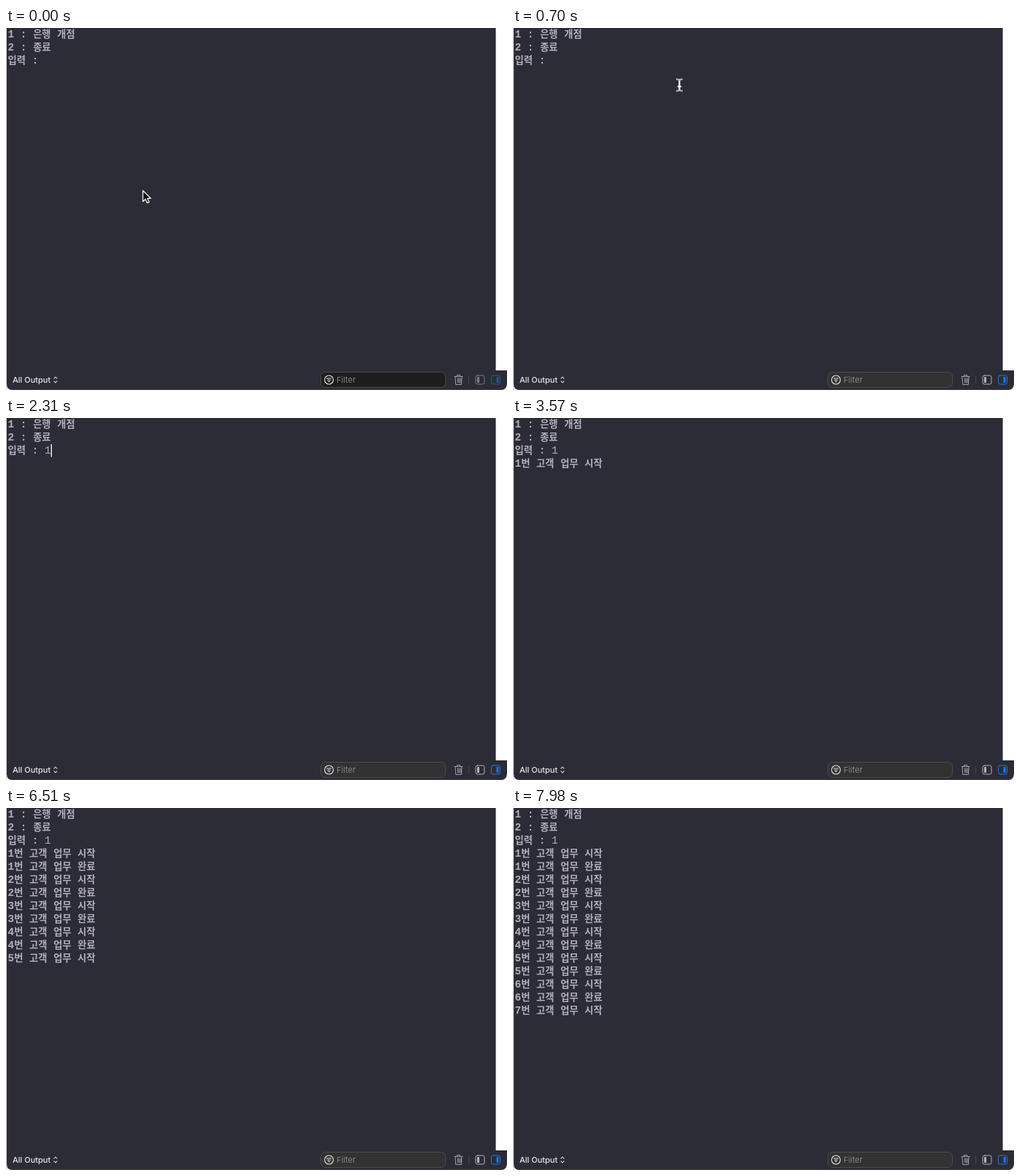
Recreate the animation shown at these times as an HTML page. Size 688x498 px, loop 8000 ms.

```html
<!DOCTYPE html>
<html lang="ko">
<head>
<meta charset="utf-8">
<style>
html, body { margin: 0; width: 100%; height: 100%; overflow: hidden; background: #fff; }
svg { display: block; width: 688px; height: 498px; }
text { white-space: pre; }
.log { font: 700 14.4px "Liberation Mono", monospace; fill: #b1afbc; }
.ko { font: 700 13.3px "Noto Sans CJK KR", "Noto Sans CJK", sans-serif; }
.ui { font: 500 11px Inter, sans-serif; }
.line { fill: none; stroke-linecap: round; stroke-linejoin: round; }
</style>
</head>
<body>
<svg viewBox="0 0 688 498">
  <path d="M1 0H672.600V471H688V490Q687 498 680 498H9Q1 498 1 490Z" fill="#2c2c37"/>
  <rect width="1" height="498" fill="#d0d0d4"/>
  <path d="M9 497.500H680" stroke="#403f4a"/>

  <g id="log" class="log"></g>
  <rect id="caret" width="1.300" height="17.500" fill="#fff"/>

  <text class="ui" x="9" y="488" fill="#e6e6ea">All Output</text>
  <path class="line" d="M66 482.200l2-2 2 2m0 3.600l-2 2-2-2" stroke="#d5d5da" stroke-width="1.100"/>

  <rect id="field" x="432.500" y="473.500" width="171" height="21" rx="6" stroke="#4b4b4f"/>
  <circle cx="443.500" cy="484" r="6" fill="none" stroke="#e4e4e6" stroke-width="1.100"/>
  <path class="line" d="M440.500 482h6m-5 2.200h4m-2.800 2.200h1.600" stroke="#e4e4e6" stroke-width="1.100"/>
  <text class="ui" x="454" y="488" fill="#858587" style="font-weight:400">Filter</text>

  <path class="line" d="M616 479.500h11m-7.500 0v-2h4v2m-6.500 0l.7 11h7.600l.7-11m-5.500 2.500l.2 6m3.600-6l-.2 6m-1.800-6v6" stroke="#a09fa8"/>
  <path d="M635.500 479v10" stroke="#474651"/>
  <g id="left"><rect class="line" x="645" y="478" width="12" height="12" rx="2.500" stroke="currentColor"/>
    <rect x="647" y="480" width="3" height="8" rx=".6" fill="currentColor"/></g>
  <g id="right"><rect class="line" x="666.500" y="478" width="12" height="12" rx="2.500" stroke="currentColor"/>
    <rect x="673.500" y="480" width="3" height="8" rx=".6" fill="currentColor"/></g>

  <path id="arrow" d="M.5.700V15.700L4 12.500 6.400 17.700 9 16.600 6.700 11.400H11.300Z" fill="#000" stroke="#fff" stroke-width="1.300" stroke-linejoin="round"/>
  <g id="beam" class="line">
    <path d="M-3.500-8Q-.8-8 0-6.500.8-8 3.500-8M0-6.500V6.500M-3.500 8Q-.8 8 0 6.500.8 8 3.500 8M-1.800 2H1.800" stroke="#fff" stroke-width="2.200"/>
    <path d="M-3.500-8Q-.8-8 0-6.500.8-8 3.500-8M-3.500 8Q-.8 8 0 6.500.8 8 3.500 8" stroke="#222" stroke-width=".6"/>
  </g>
</svg>
<script>
const $ = id => document.getElementById(id);
const LOOP = 8000, TICK = 70, CLICK = 420;
const ENTER = 2870, START = 2940, JOB = 735, BLINK = 595;

const show = (el, on) => el.style.display = on ? '' : 'none';
const wrapKo = s => s.replace(/[가-힣]+/g, '<tspan class="ko">$&</tspan>');
const row = (s, i) => `<text x="2.600" y="${13 + 18 * i}">${wrapKo(s)}</text>`;

function logLines(t) {
  const typed = t >= 2310 ? '<tspan font-weight="400">1</tspan>' : '';
  const lines = ['1 : 은행 개점', '2 : 종료', '입력 : ' + typed];
  if (t >= START) {
    const done = Math.floor((t - START) / JOB);
    for (let n = 1; n <= done + 1; n++) {
      lines.push(n + '번 고객 업무 시작');
      if (n <= done) lines.push(n + '번 고객 업무 완료');
    }
  }
  return lines;
}

// [x, y] of the caret, or null while it is hidden
function caretAt(t, count) {
  if (t >= START) return (t - START) % JOB < BLINK ? [2.500, 18 * count] : null;
  if (t >= ENTER) return [2.500, 54];
  if (t >= 2310) return [61.700, 36];
  return t >= 2240 || (t >= 1120 && t < 1680) ? [53, 36] : null;
}

function pointerAt(t) {
  if (t >= 1400) return [311, 65];
  if (t >= 1330) return [262, 63];
  if (t >= 980) return [215, 61];
  if (t >= 910) return [217, 64];
  if (t >= 840) return [223, 71];
  const p = Math.min(t / 700, 1), s = p * p * (3 - 2 * p);
  const curve = (a, b, c) => a * (1 - s) ** 2 + 2 * b * s * (1 - s) + c * s * s;
  return [curve(187.500, 122, 228.500), curve(223, 130, 78.500)];
}

let last = '';
function draw(now) {
  const t = Math.floor(now % LOOP / TICK) * TICK;
  const lines = logLines(t), html = lines.map(row).join('');
  if (html !== last) $('log').innerHTML = last = html;

  const caret = caretAt(t, lines.length);
  show($('caret'), caret);
  if (caret) {
    $('caret').setAttribute('x', caret[0]);
    $('caret').setAttribute('y', caret[1]);
  }

  const active = t >= CLICK;
  $('field').setAttribute('fill', active ? '#323232' : '#1d1d1e');
  $('left').style.color = active ? '#b4b3bb' : '#7d7c86';
  $('right').style.color = active ? '#1b78ea' : '#205a9e';

  const move = `translate(${pointerAt(t)})`;
  show($('arrow'), !active);
  show($('beam'), active && t < 2310);
  $('arrow').setAttribute('transform', move);
  $('beam').setAttribute('transform', move);
  requestAnimationFrame(draw);
}
draw(0);
</script>
</body>
</html>
```
